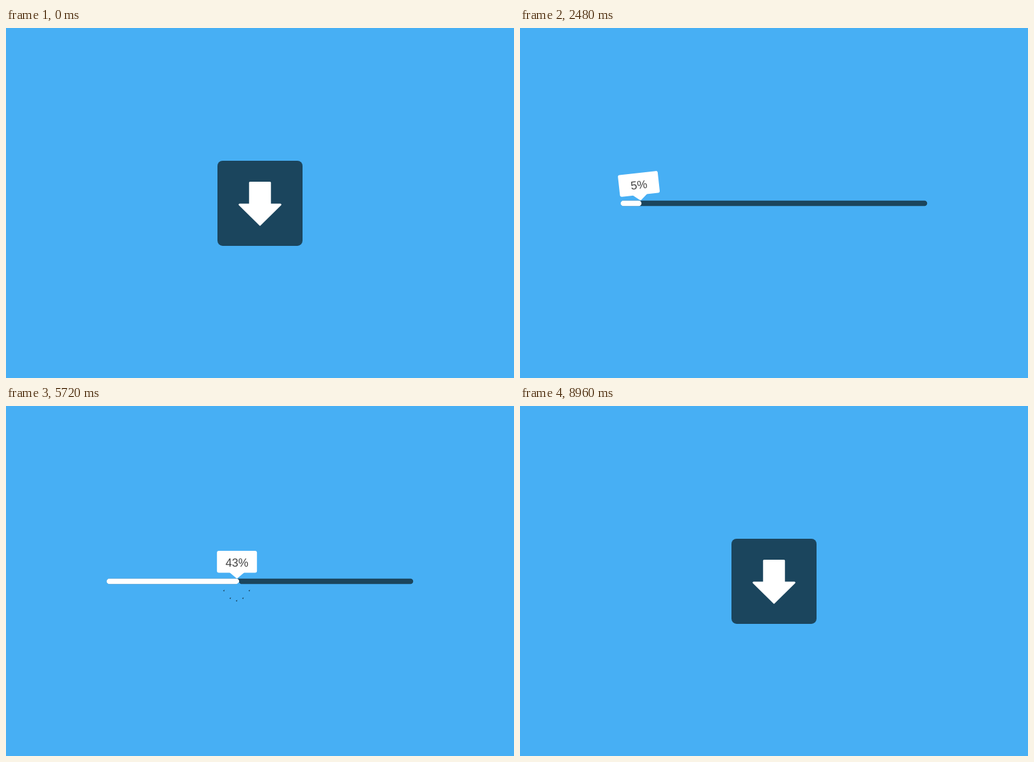
Recreate the animation shown at these times as an HTML page. Size 800 by 551 pixels, loop 9040 ms.

```html
<!DOCTYPE html>
<html lang="en">
<head>
<meta charset="utf-8">
<title>Download progress</title>
<style>
  html, body { margin: 0; height: 100%; overflow: hidden; background: #47aff4; }
  svg { display: block; width: 100%; height: 100%; }
  text { font: 18px "Liberation Sans", Arial, sans-serif; fill: #444; text-anchor: middle; }
</style>
</head>
<body>
<svg viewBox="0 0 800 551">
  <rect id="bar" fill="#1b455d"/>
  <rect id="fill" fill="#fff" x="158.5"/>
  <path id="hole" fill="#47aff4" d="M363 281L366.5 277.5L370.5 281Z"/>
  <path id="stream" fill="#fff"/>
  <path id="chips" fill="#1b455d"/>
  <g id="bubble" fill="#fff">
    <rect id="body"/>
    <path id="tail" stroke="#fff" stroke-width="3" stroke-linejoin="round"/>
    <text id="label" y="-18"></text>
  </g>
</svg>
<script>
const LOOP = 9040, STEP = 40;
const el = id => document.getElementById(id);
const set = (id, attrs) => {
  for (const name in attrs) el(id).setAttribute(name, attrs[name]);
};

// Progress from 0 to 1 between two times: linear, eased, and there-and-back.
const part = (t, from, to) => Math.max(0, Math.min(1, (t - from) / (to - from)));
const ease = (t, from, to, power = 1) => {
  const u = part(t, from, to) ** power;
  return u * u * (3 - 2 * u);
};
const bump = (t, from, to) => Math.sin(Math.PI * part(t, from, to)) ** 2;

const firstLeg = t => ease(t, 2160, 3080);
const secondLeg = t => ease(t, 3520, 5160, 1.55);
const slide = t => 400 - 241 * ease(t, 1240, 2060) + 111 * firstLeg(t) + 93.7 * secondLeg(t);

function drawBar(t) {
  const long = ease(t, 680, 1080) - ease(t, 8350, 8680);
  const thin = ease(t, 680, 1040) - ease(t, 8320, 8660);
  const stretch = bump(t, 1000, 1240) + bump(t, 8160, 8400);
  const w = 134 + 348.5 * long + 37 * stretch;
  const h = 134 - 125.5 * thin;
  set("bar", { x: 400 - w / 2, y: 275.9 - h / 2, width: w, height: h, rx: Math.min(h / 2, 4 + h / 33) });
}

function drawFill(t) {
  const end = slide(t) + 5 * firstLeg(t) - 1.5 * secondLeg(t);
  const h = 8.5 * (1 - ease(t, 6000, 6840));
  set("fill", { y: 280.2 - h, width: firstLeg(t) && end - 158.5, height: h, rx: h / 2 });
}

function drawLeak(t) {
  set("hole", { opacity: +(t >= 5600 && t < 7920) });

  const u = part(t, 5560, 5800);
  let chips = "";
  if (u > 0 && u < 1) {
    for (let i = -2; i <= 2; i++) {
      const x = 363 + i * 15 * u, y = 280 + (40 - 6 * i * i) * u, r = 4 * (1 - u);
      chips += `M${x - r} ${y}L${x + r} ${y - r}L${x + r / 2} ${y + r}Z`;
    }
  }
  set("chips", { d: chips });

  const head = 280 + 255 * part(t, 6000, 6240) ** 2;
  const top = 280 + 255 * part(t, 6800, 7000) ** 2;
  const neck = Math.min(head, top + 40 * part(t, 6800, 6880));
  const w = 3 - 2 * ease(t, 6000, 6880);
  set("stream", {
    d: top < head ? `M367.2 ${top}L${367.2 + w} ${neck}V${head}H${367.2 - w}V${neck}Z` : ""
  });
}

function drawBubble(t) {
  const x = slide(t) + 36.3 * ease(t, 8360, 8800);
  const y = 311 - 40 * (ease(t, 680, 1240) - ease(t, 8300, 8920))
    - 68 * bump(t, 680, 1240) - 86 * bump(t, 8300, 8920);

  // The top lags behind the moving tip.
  const speed = (slide(t + 5) - slide(t - 5)) / 10;
  const tilt = -15.5 * Math.sign(speed) * Math.sqrt(Math.abs(speed));
  const flip = Math.PI * part(t, 6920, 7280);
  const sx = Math.max(.02, Math.abs(Math.cos(flip)));
  const sy = 1 + .13 * Math.sin(flip);
  set("bubble", { transform: `translate(${x} ${y}) rotate(${tilt}) scale(${sx} ${sy})` });

  // 1 is the arrow, 0 the speech bubble
  const m = 1 - ease(t, 680, 1000) + ease(t, 8340, 8720);
  const half = 31.5 - 14.25 * m, base = -8.5 - 26 * m;
  set("body", {
    x: -half, y: base - 34.5, width: 2 * half, height: 34.5 + 3 * m, rx: 3 - 1.5 * m
  });
  const wing = 10.4 + 21.8 * m, shoulder = base - 1.5 + 3 * m;
  set("tail", { d: `M${-wing} ${shoulder}H${wing}L0 -1.2Z` });

  const percent = 18 * firstLeg(t) + 25 * secondLeg(t) ** 1.1;
  el("label").textContent = Math.floor(percent) + "%";
  set("label", { opacity: t < 7100 ? ease(t, 1600, 1800) : 0 });
}

function draw(now) {
  const t = Math.floor(now % LOOP / STEP) * STEP;
  drawBar(t);
  drawFill(t);
  drawLeak(t);
  drawBubble(t);
}

const start = performance.now();
function tick() {
  draw(performance.now() - start);
  requestAnimationFrame(tick);
}
tick();
</script>
</body>
</html>
```
